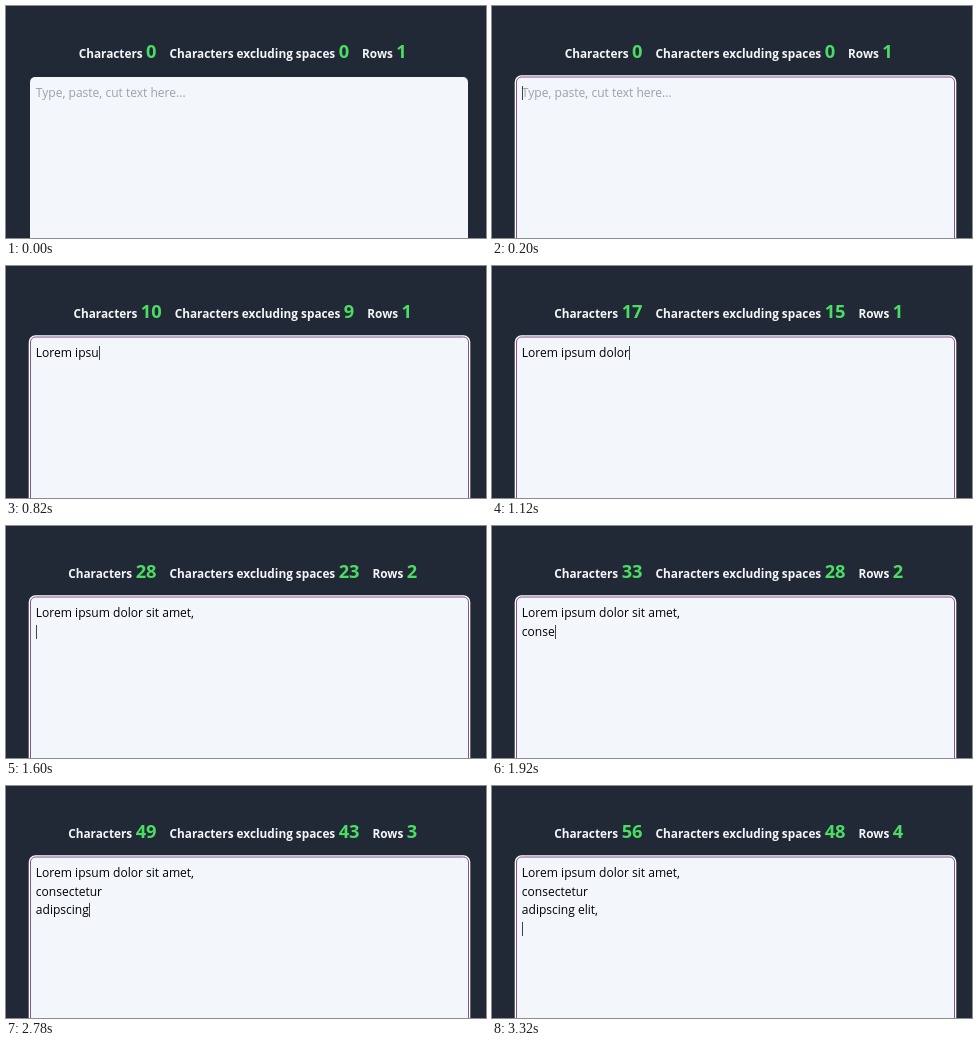
An HTML page for the animation above (3340 ms loop, 480x232 px).

```html
<!DOCTYPE html>
<html lang="en">
<head>
<meta charset="utf-8">
<title>Character counter</title>
<style>
  html, body { margin: 0; width: 100%; height: 100%; overflow: hidden; background: #212836; }
  body { position: relative; font-family: "Open Sans", "Noto Sans", sans-serif; }
  #stats {
    position: absolute; left: 236.7px; top: 32px; transform: translateX(-50%);
    display: flex; gap: 13px; line-height: 25px; white-space: nowrap;
    font-size: 11.8px; font-weight: 700; color: #f5f6f8;
  }
  #stats b { margin-left: 3.4px; font-size: 18.3px; color: #4bdc63; }
  #area {
    position: absolute; left: 24px; top: 71px; width: 438px; height: 200px;
    border-radius: 5px; background: #f3f6fb;
  }
  #ring { position: absolute; left: 0; top: 0; }
  #ring rect { fill: #f3f6fb; }
  #text, #hint {
    position: absolute; left: 29.8px; top: 78px;
    font-size: 12.05px; line-height: 18.6px; white-space: pre; color: #000;
  }
  #hint { color: #9ca1ab; }
  #caret {
    display: inline-block; width: 1px; height: 14px; margin-right: -1px;
    vertical-align: -3px; background: #444;
  }
</style>
</head>
<body>
<div id="stats">
  <span>Characters<b id="chars">0</b></span>
  <span>Characters excluding spaces<b id="solid">0</b></span>
  <span>Rows<b id="rows">1</b></span>
</div>
<div id="area"></div>
<svg id="ring" width="480" height="232">
  <rect x="23.4" y="69.9" width="440.2" height="200" rx="6" stroke="#fff" stroke-width="1.4"/>
  <rect x="24.5" y="71" width="438" height="200" rx="5" stroke="#85548f"/>
</svg>
<div id="hint">Type, paste, cut text here...</div>
<div id="text"><span id="typed"></span><i id="caret"></i></div>
<script>
const LOOP = 3340, FOCUS = 20;
const TEXT = "Lorem ipsum dolor sit amet,\nconsectetur\nadipscing elit,\n";
// [ms, characters typed]; typing is even between the points
const KEYS = [
  [0, 0], [389, 0], [390, 1], [540, 4], [600, 5], [1040, 16], [1100, 17], [1150, 18],
  [1580, 28], [1700, 29], [2200, 39], [2240, 40], [2360, 41], [2770, 49],
  [2830, 50], [3180, 55], [3260, 56], [LOOP, 56]
];
const $ = id => document.getElementById(id);
const show = (id, on) => $(id).style.visibility = on ? "visible" : "hidden";

function typedAt(t) {
  const i = KEYS.findLastIndex(k => t >= k[0]);
  const [t0, n0] = KEYS[i], [t1, n1] = KEYS[i + 1];
  return Math.floor(n0 + (n1 - n0) * (t - t0) / (t1 - t0));
}

function draw(t) {
  const s = TEXT.slice(0, typedAt(t));
  $("typed").textContent = s;
  $("chars").textContent = s.length;
  $("solid").textContent = s.replace(/\s/g, "").length;
  $("rows").textContent = s.split("\n").length;
  show("hint", s === "");
  show("caret", t >= FOCUS);
  show("ring", t >= FOCUS);
}

const start = performance.now();
function tick() {
  draw((performance.now() - start) % LOOP);
  requestAnimationFrame(tick);
}
draw(0);
requestAnimationFrame(tick);
</script>
</body>
</html>
```
